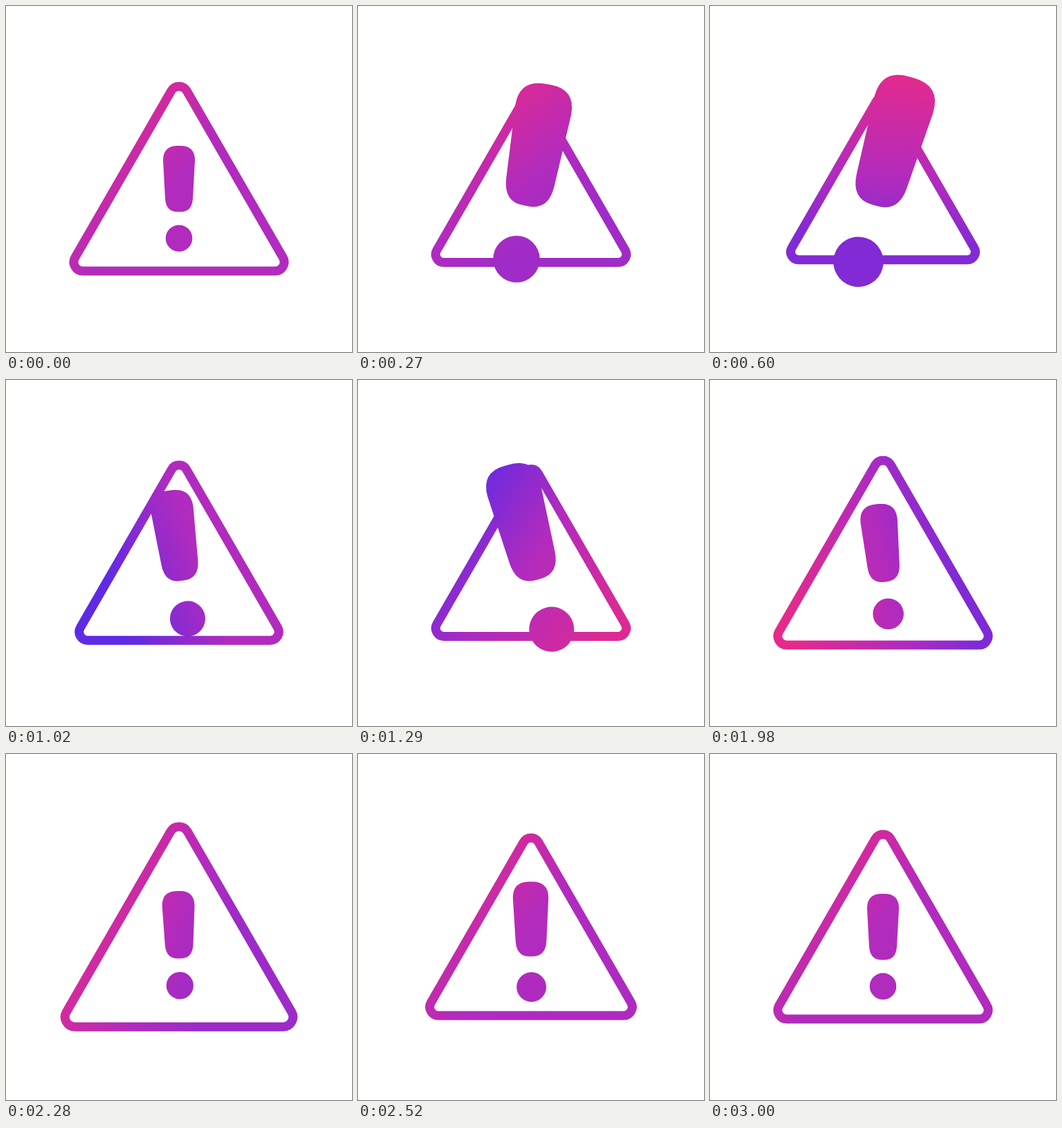
These frames come from a looping animation (500x500 px, 3.53 s). An HTML page:

```html
<!DOCTYPE html>
<html lang="en">
<head>
<meta charset="utf-8">
<title>Warning</title>
<style>
  html, body { margin: 0; width: 100%; height: 100%; overflow: hidden; background: #fff; }
  svg { display: block; width: 100vw; height: 100vh; }
</style>
</head>
<body>
<svg viewBox="0 0 500 500">
  <defs>
    <linearGradient id="tint" gradientUnits="userSpaceOnUse">
      <stop id="farStop" offset="0"/>
      <stop id="midStop" stop-color="rgb(177,43,190)"/>
      <stop id="nearStop" offset="1"/>
    </linearGradient>
    <mask id="icon" maskUnits="userSpaceOnUse" x="0" y="0" width="500" height="500">
      <path id="triangle" fill="none" stroke="#fff"
        d="M99.74 363.5 238.74 122.75A13 13 0 0 1 261.26 122.75L400.26 363.5A13 13 0 0 1 389 383H111A13 13 0 0 1 99.74 363.5Z"/>
      <g id="bang" fill="#fff" stroke="#fff" stroke-linejoin="round">
        <path d="M248 206H252Q269 206 269 223L266 278Q265 293.5 252 293.5H248Q235 293.5 234 278L231 223Q231 206 248 206Z"/>
        <circle cx="250" cy="335.7" r="15.25"/>
      </g>
    </mask>
  </defs>
  <rect width="500" height="500" fill="url(#tint)" mask="url(#icon)"/>
</svg>
<script>
const LOOP = 3530, ACTIVE = 3000, STEP = 30;
const CENTER = 250, PIVOT_Y = 279;
const PURPLE = [177, 43, 190], PINK = [229, 42, 139], BLUE = [88, 42, 232];
const PINK_REACH = 155;
const $ = id => document.getElementById(id);

// Smooth curve through [time, value] keys that never overshoots them.
function curve(...keys) {
  const secant = i => (keys[i + 1][1] - keys[i][1]) / (keys[i + 1][0] - keys[i][0]);
  const slope = keys.map((_, i) => {
    if (i === 0 || i === keys.length - 1) return 0;
    const a = secant(i - 1), b = secant(i);
    return a * b <= 0 ? 0 : 2 * a * b / (a + b);
  });
  return time => {
    let i = 0;
    while (i < keys.length - 2 && time > keys[i + 1][0]) i++;
    const [t0, v0] = keys[i], [t1, v1] = keys[i + 1];
    const h = t1 - t0, u = (time - t0) / h, w = 1 - u;
    return v0 * (1 + 2 * u) * w * w + slope[i] * h * u * w * w
         + v1 * u * u * (3 - 2 * u) - slope[i + 1] * h * u * u * w;
  };
}

const bell = (t, peak, width) => Math.exp(-(((t - peak) / width) ** 2));
const blend = (a, b, k) => `rgb(${a.map((v, i) => Math.round(v + (b[i] - v) * k))})`;

// Two squeezes of the triangle, then an overshoot that settles.
const squeeze = curve([0, 0], [440, 1], [600, .87], [990, .36], [1600, 1],
  [1980, 0], [2180, -.86], [2500, .27], [3000, 0]);
// The mark swells while the triangle is squeezed.
const swell = curve([0, 0], [440, 1], [600, .78], [1020, .29], [1600, 1],
  [1980, .14], [2200, 0], [2520, .1], [3000, 0]);
const tilt = curve([0, 0], [500, 18.2], [1020, -8.1], [1600, -19], [2150, -1.5], [3000, 0]);
const tintAngle = curve([0, 222], [1020, 340], [1800, 500], [2520, 579], [3000, 582]);

function set(id, attributes) {
  for (const name in attributes) $(id).setAttribute(name, attributes[name]);
}

function drawTint(t) {
  const angle = tintAngle(t) * Math.PI / 180;
  const dx = Math.cos(angle), dy = Math.sin(angle);
  const fade = bell(t, 1020, 200);
  const blueness = Math.max(0, Math.sin(Math.PI * t / 2600)) ** 1.5;
  const reach = 70 + 90 * bell(t, 1350, 600);
  const far = 25 * fade - reach, near = 25 * fade + PINK_REACH;
  set('tint', {
    x1: CENTER + dx * far, y1: CENTER + dy * far,
    x2: CENTER + dx * near, y2: CENTER + dy * near
  });
  set('midStop', { offset: reach / (reach + PINK_REACH) });
  set('farStop', { 'stop-color': blend(PURPLE, BLUE, blueness) });
  set('nearStop', { 'stop-color': blend(PINK, PURPLE, fade) });
}

function draw(t) {
  const outer = 1 - .14 * squeeze(t);
  const inner = 1 + 1.42 * swell(t);
  const angle = tilt(t);
  const x = CENTER - .15 * angle;
  const y = PIVOT_Y - 28 * Math.max(0, swell(t)) ** .6;
  // Stroke widths are divided by scale so that lines keep their weight.
  set('triangle', {
    transform: `translate(250 250) scale(${outer}) translate(-250 -250)`,
    'stroke-width': 13 / outer
  });
  set('bang', {
    transform: `translate(${x} ${y}) rotate(${angle}) scale(${inner}) translate(-250 ${-PIVOT_Y})`,
    'stroke-width': 8 / inner
  });
  drawTint(t);
}

const start = performance.now();
function tick() {
  const elapsed = (performance.now() - start) % LOOP;
  draw(Math.min(ACTIVE, Math.floor(elapsed / STEP) * STEP));
  requestAnimationFrame(tick);
}
tick();
</script>
</body>
</html>
```
